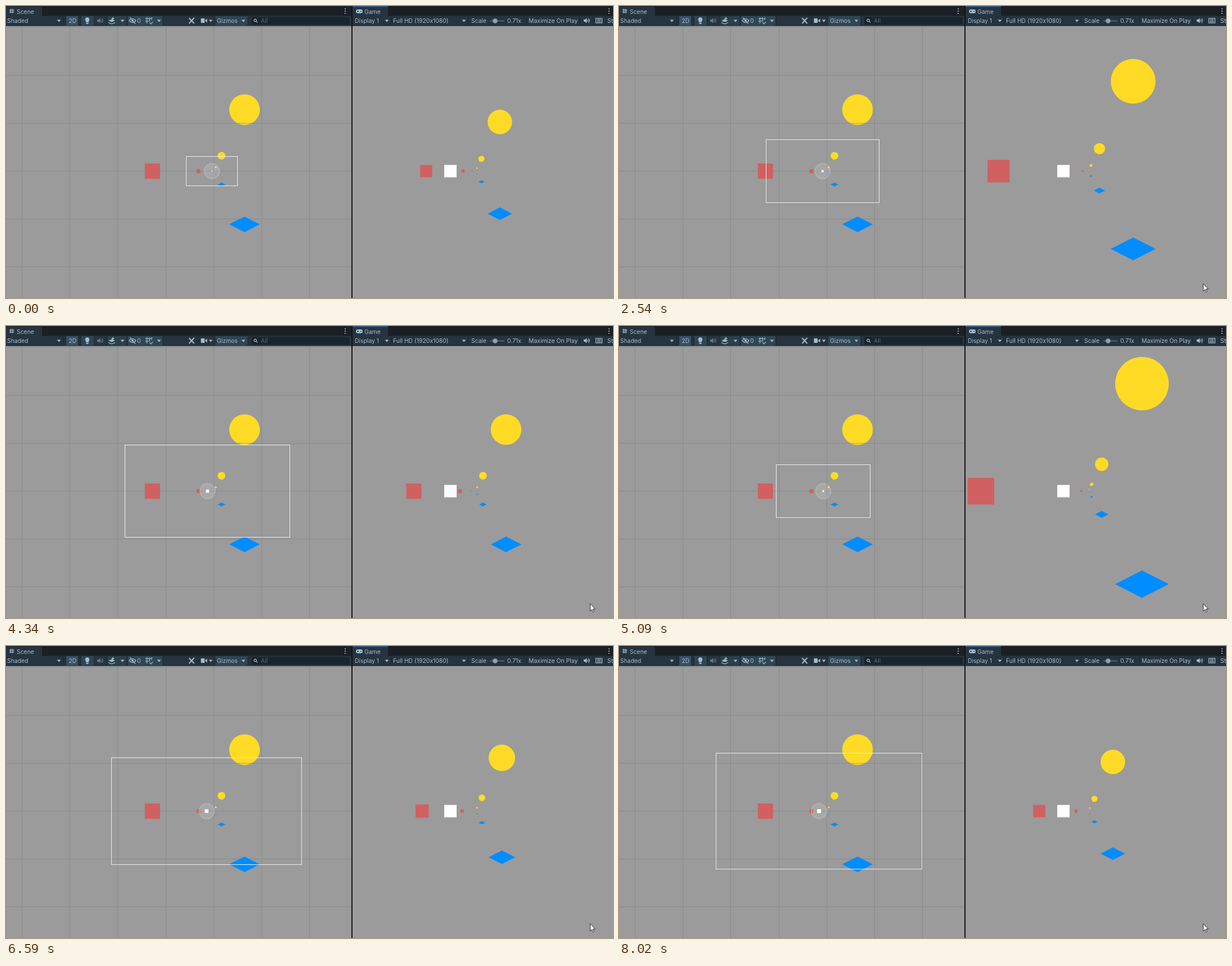
An HTML page for the animation above (8080 ms loop, 1079 by 519 pixels).

```html
<!DOCTYPE html>
<html lang="en">
<head>
<meta charset="utf-8">
<title>Endless zoom</title>
<style>
  html, body { margin: 0; width: 100%; height: 100%; overflow: hidden; background: #9b9b9b; }
  svg { display: block; width: 1079px; height: 519px; }
  text { font: 10.4px Inter, sans-serif; fill: #a3bccd; white-space: pre; }
  .dim { fill: #52697a; }
  .icon { fill: #a3bccd; stroke: none; }
  .line { fill: none; stroke: #a3bccd; stroke-width: 1.2; }
  .faded { opacity: .5; }
  .sep { stroke: #1b262f; stroke-width: 1; }
  .grid { stroke: #8a8a8a; stroke-width: 1; }
</style>
</head>
<body>
<svg viewBox="0 0 1079 519">
  <defs>
    <clipPath id="sceneClip"><rect y="35" width="614" height="484"/></clipPath>
    <clipPath id="gameClip"><rect x="616" y="35" width="463" height="484"/></clipPath>
  </defs>

  <rect width="1079" height="519" fill="#9b9b9b"/>
  <g clip-path="url(#sceneClip)">
    <g id="grid" class="grid"></g>
    <g id="sceneWorld" transform="translate(369.4 293.5)"></g>
    <path d="M411 208.5h26" stroke="#a8934a" stroke-opacity=".75"/>
    <rect id="scenePlayer" fill="#fff"/>
    <circle id="gizmo" cy="293.5" r="13.7" fill="#fff" fill-opacity=".13" stroke="#d2d2cc" stroke-opacity=".6"/>
    <rect id="frustum" fill="none" stroke="#ececec"/>
  </g>
  <g clip-path="url(#gameClip)">
    <g id="gameWorld"></g>
    <rect x="779" y="282.5" width="22" height="22" fill="#fff"/>
  </g>

  <!-- tabs and toolbars -->
  <rect width="1079" height="18" fill="#1a2026"/>
  <rect y="1" width="64" height="17" fill="#263440"/>
  <rect x="616" y="1" width="63" height="17" fill="#263440"/>
  <rect x="616" width="63" height="1.5" fill="#35618a"/>
  <rect y="17.5" width="1079" height="17.5" fill="#263440"/>
  <rect y="34.2" width="1079" height="1.3" fill="#1a2229"/>
  <rect x="107" y="18" width="21" height="16.5" fill="#385063"/>
  <rect x="134" y="18" width="22" height="16.5" fill="#304554"/>
  <rect x="180" y="18" width="34" height="16.5" fill="#2c3f4d"/>
  <rect x="216" y="18" width="62" height="16.5" fill="#304554"/>
  <rect x="372" y="18" width="57" height="16.5" fill="#304554"/>
  <rect x="436" y="19.5" width="175" height="13.5" rx="3" fill="#1a242c"/>
  <g id="separators" class="sep"></g>
  <g id="arrows" class="icon"></g>
  <g id="menus" class="icon"></g>
  <g id="labels"></g>

  <!-- toolbar icons -->
  <path class="line" d="M8.5 5v8M12 5v8M6 7.3h8.500M6 10.800h8.500"/>
  <path class="icon" d="M144.500 20a4 4 0 0 0-2.500 7v2h5v-2a4 4 0 0 0-2.500-7zM142.500 30h4v2h-4z"/>
  <g id="speakers"></g>
  <path class="icon" d="M182 26l6-2.500 6 2.500-6 2.500zM182 28.700l6 2.500 6-2.500v1.300l-6 2.500-6-2.500zM190 19l1 2.200 2.200 1-2.200 1-1 2.200-1-2.200-2.200-1 2.200-1z"/>
  <path class="line" d="M219 26q6-7 12 0q-6 7-12 0zM220 20.500l10 11"/>
  <circle class="icon" cx="225" cy="26" r="1.900"/>
  <path class="line" d="M247.500 22.500h12M247.500 27h8M250.500 20v11M255 20v7M259 20v5M255 29l3 3 3-4"/>
  <path class="line" d="M325.500 21.500l9 9.500M334.500 21l-9 10" style="stroke-width:2"/>
  <path class="icon" d="M346.500 22h6.500v8h-6.500zM353.500 26l4-3.500v7z"/>
  <circle class="line" cx="443" cy="25.500" r="2.200"/>
  <path class="line" d="M444.700 27.200l2.500 2.500"/>
  <rect class="icon" x="622" y="6" width="12" height="7" rx="3.500"/>
  <path d="M624 9.500h3M625.500 8v3M629.500 9.500h2.500" stroke="#263440"/>
  <path d="M861 26.500h25" stroke="#58707f" stroke-width="1.500"/>
  <circle cx="869.500" cy="26.500" r="4.300" fill="#8aa2b3"/>
  <rect class="line" x="1048.500" y="22" width="11" height="8"/>
  <path class="line" d="M1050 24.700h8M1050 27.400h8M1052.500 22v8M1055.500 22v8" style="stroke-width:.8"/>

  <rect x="614" width="2" height="519" fill="#111416"/>
  <path id="cursor" d="M.5.500v13l3-2.700 2 4.700 2-.9-2-4.600h3.800z" fill="#fff" stroke="#1c1c1c" stroke-width=".9"/>
</svg>

<script>
const LOOP = 8080;
const $ = id => document.getElementById(id);
const fill = (id, items, draw) => { $(id).innerHTML = items.map(draw).join(''); };
const setAttrs = (node, attrs) => {
  for (const name in attrs) node.setAttribute(name, attrs[name]);
};

fill('grid', [0, 1, 2, 3, 4, 5, 6], i => {
  const x = Math.floor(28.3 + i * 85.25) + .5;
  const y = Math.floor(37.8 + i * 85.2) + .5;
  return `<path d="M${x} 35v484M0 ${y}h614"/>`;
});
fill('separators', [102, 106, 129, 133, 156, 179, 215, 279, 342, 371, 430, 684, 821, 925, 1019, 1043, 1066],
  x => `<path d="M${x}.5 18v16.500"/>`);
fill('arrows', [94, 207, 272, 364, 422, 677, 814], x => `<path d="M${x - 3.5} 24.500h7l-3.500 4z"/>`);
fill('menus', [603, 1072], x => [5, 9, 13].map(y => `<circle cx="${x}" cy="${y}" r="1.100"/>`).join(''));
fill('labels', [
  ['Scene', 19, 13.5], ['Shaded', 2], ['2D', 111.5], ['0', 233], ['Gizmos', 375], ['All', 453, 30, 'dim'],
  ['Game', 637, 13.5], ['Display 1', 620], ['Full HD (1920x1080)', 688], ['Scale', 827],
  ['0.71x', 891], ['Maximize On Play', 929], ['Stats', 1069]
], ([label, x, y = 30, kind = '']) => `<text x="${x}" y="${y}" class="${kind}">${label}</text>`);
fill('speakers', [[162, 'faded'], [1027, '']], ([x, kind]) =>
  `<g class="${kind}" transform="translate(${x} 26)">
    <path class="icon" d="M0-2h2.500l3-2.500v9l-3-2.500H0z"/>
    <path class="line" d="M7-2q1.500 2 0 4M8.500-3.800q3.200 3.800 0 7.600"/></g>`);

// The same trio of shapes repeats at a quarter of the size towards the origin.
const world = [0, 1, 2, 3, 4, 5].map(level => `<g transform="scale(${4 ** -level})">
  <circle cx="54.6" cy="-109.3" r="27.2" fill="#ffdb25"/>
  <rect x="-122.6" y="-13.6" width="27" height="27.2" fill="#d16060"/>
  <path d="M27.300 94.600l27.300-13.900 27.300 13.900-27.300 13.900z" fill="#008dff"/></g>`).join('');
$('sceneWorld').innerHTML = $('gameWorld').innerHTML = world;

// Time and zoom at the turning and passing points of the camera.
const zoomKeys = [
  [1140, 3.2], [1950, 2.25], [2540, 1.462], [2770, 1.278], [3580, .782], [3800, .725],
  [4340, 1], [4400, 1.063], [5150, 1.79], [5320, 1.866], [5840, 1.429], [6030, 1.295],
  [6860, .718], [7270, .571], [7685, .687], [8020, .8], [LOOP, .8]
].map(([time, zoom]) => [time, Math.log(zoom)]);

const rates = zoomKeys.slice(1).map(([t, v], i) => (v - zoomKeys[i][1]) / (t - zoomKeys[i][0]));
const slopes = zoomKeys.map((_, i) => {
  const a = rates[i - 1], b = rates[i];
  return a * b > 0 ? 2 * a * b / (a + b) : 0;
});

function zoomAt(time) {
  if (time <= zoomKeys[0][0]) return Math.exp(zoomKeys[0][1]);
  const i = zoomKeys.findIndex(key => key[0] > time) - 1;
  const [t0, a] = zoomKeys[i], [t1, b] = zoomKeys[i + 1];
  const span = t1 - t0, u = (time - t0) / span, w = 1 - u;
  return Math.exp(a * w * w * (1 + 2 * u) + b * u * u * (3 - 2 * u)
    + span * u * w * (slopes[i] * w - slopes[i + 1] * u));
}

const cursorKeys = [
  [20, 1047, 510], [200, 1038, 493], [340, 1038, 493],
  [430, 1028, 483], [530, 1038, 493], [LOOP, 1038, 493]
];

function cursorAt(time) {
  const i = cursorKeys.findIndex(key => key[0] > time) - 1;
  const [t0, x0, y0] = cursorKeys[i], [t1, x1, y1] = cursorKeys[i + 1];
  const u = (time - t0) / (t1 - t0);
  return [x0 + (x1 - x0) * u, y0 + (y1 - y0) * u];
}

function centredBox(x, y, width, height, snap = v => v) {
  const left = snap(x - width / 2), top = snap(y - height / 2);
  return { x: left, y: top, width: snap(x + width / 2) - left, height: snap(y + height / 2) - top };
}

const halfPixel = v => Math.floor(v) + .5;

function render(now) {
  const time = now % LOOP;
  const zoom = zoomAt(time);
  const playerX = 369.4 - 11.05 / zoom;

  $('gameWorld').setAttribute('transform', `translate(834.2 293.5) scale(${4 * zoom})`);
  setAttrs($('frustum'), centredBox(playerX, 293.5, 293 / zoom, 164.4 / zoom, halfPixel));
  setAttrs($('scenePlayer'), centredBox(playerX, 293.5, 5.5 / zoom, 5.5 / zoom));
  $('gizmo').setAttribute('cx', playerX);

  const visible = time >= 20;
  $('cursor').style.display = visible ? '' : 'none';
  if (visible) $('cursor').setAttribute('transform', `translate(${cursorAt(time).join(' ')})`);
  requestAnimationFrame(() => render(performance.now() - start));
}

const start = performance.now();
render(0);
</script>
</body>
</html>
```
